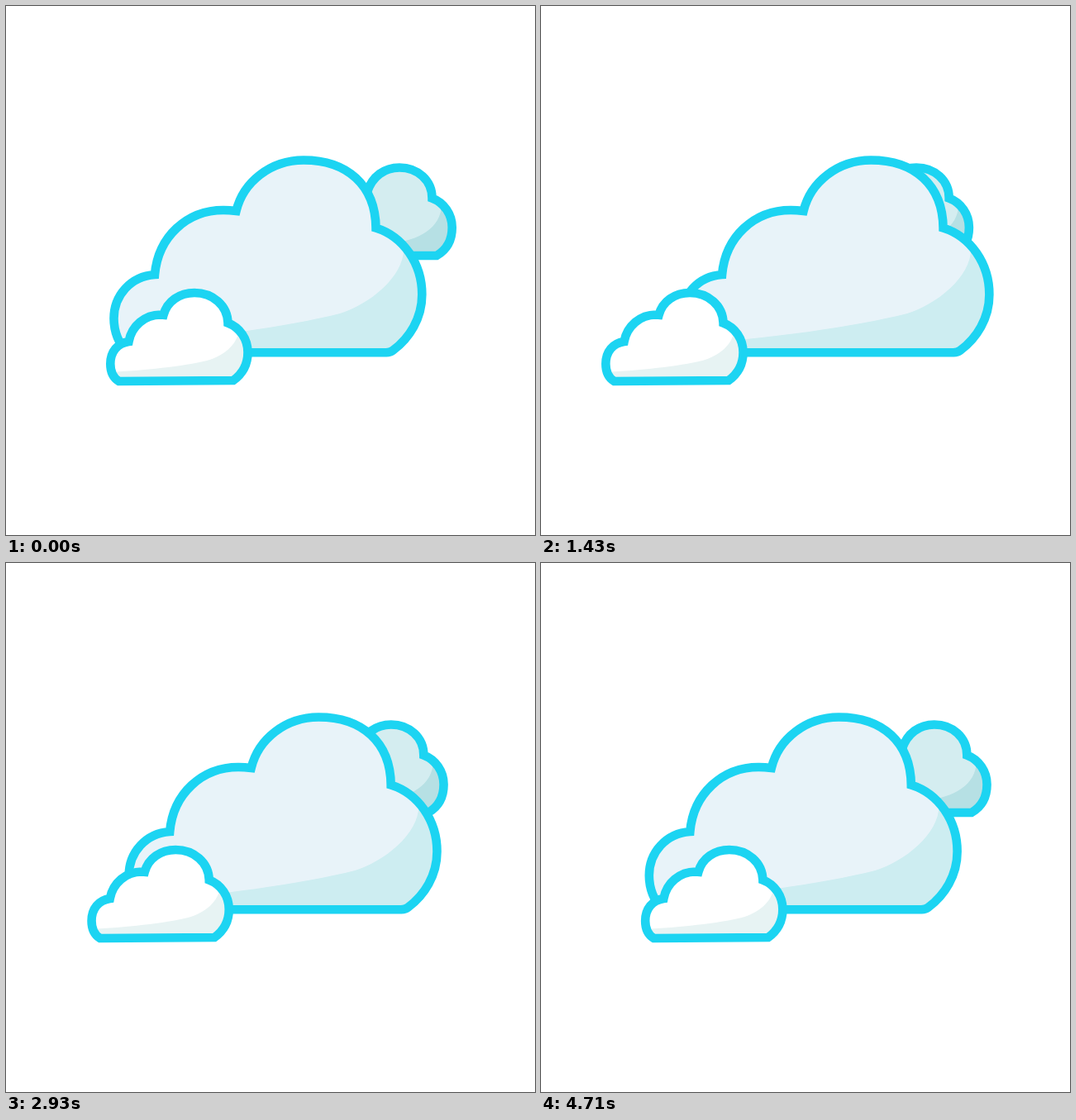
Write an HTML page with a canvas that moves like this. It is 640 by 640 pixels and loops after 4780 ms.

```html
<!DOCTYPE html>
<html lang="en">
<head>
<meta charset="utf-8">
<title>Drifting clouds</title>
<style>
  html, body { margin: 0; width: 100%; height: 100%; overflow: hidden; background: #fff; }
  canvas { display: block; width: 640px; height: 640px; }
</style>
</head>
<body>
<canvas id="sky" width="640" height="640"></canvas>
<script>
const ctx = document.getElementById('sky').getContext('2d');
const LOOP = 4780;
const FPS = 14;
const LINE = '#1cd4f2';

// Each cloud rests at keys 0, 2, 4 and is fully shifted at keys 1 and 3.
const evenKeys = [0, 1195, 2390, 3585, 4780];

const clouds = [
  {
    shift: -24, keys: evenKeys, fill: '#d4edf0', shadeFill: '#b6e0e4',
    body: new Path2D('M430 302 L521 302 C533 295 539.7 283 539.7 268' +
      ' C539.7 252 530 238 515.5 232.5 C515.5 211 498 195.5 476 195.5' +
      ' C458 195.5 443 206 437 225 C431 250 430 280 430 302 Z'),
    shade: new Path2D('M465 287 C500 284 526 268 527 241 L560 241 L560 320 L465 320 Z')
  },
  {
    shift: 43, keys: evenKeys, fill: '#e8f3f9', shadeFill: '#cdedf1',
    body: new Path2D('M180 325 C151 327 130.5 350 130.5 378' +
      ' C130.5 393 136 410 148 419.3 L460 419.3 Q465 419 468 416.8' +
      ' C488 402 503.3 378 503.3 349 C503.3 312 481 279 447.5 268.5' +
      ' C447 217 413 186.5 360 186.5 C320 186.5 287 213 278.5 248' +
      ' C273 247.3 268 247 263 247 C219 247 184 279 180 325 Z'),
    shade: new Path2D('M120 410 C230 404 340 388 404 372' +
      ' C440 361 484 326 481 290 L520 290 L520 430 L120 430 Z')
  },
  {
    shift: -53, keys: [0, 1190, 2385, 3580, 4750], fill: '#fff', shadeFill: '#e7f3f3',
    body: new Path2D('M148.5 406 C135 408 126.3 418 126.3 433' +
      ' C126.3 443 130 450 136.5 454 L275 453' +
      ' C286 445 292.5 433 292.5 419 C292.5 403 283 389 268.5 383.5' +
      ' C268 362 250 347 228 347 C210 347 195 357 190.5 373.8' +
      ' L187 373.5 C168 373.5 152 387 148.5 406 Z'),
    shade: new Path2D('M125 443 C165 441 215 436 243 429' +
      ' C262 424 281 410 282 390 L300 390 L300 460 L125 460 Z')
  }
];

function drift(t, keys) {
  let i = 0;
  while (i < 4 && t >= keys[i + 1]) i++;
  if (i === 4) return 0;
  const p = (t - keys[i]) / (keys[i + 1] - keys[i]);
  const eased = (1 - Math.cos(Math.PI * p)) / 2;
  return i % 2 ? 1 - eased : eased;
}

function drawCloud(cloud, t) {
  ctx.save();
  ctx.translate(cloud.shift * drift(t, cloud.keys), 0);
  ctx.fillStyle = cloud.fill;
  ctx.fill(cloud.body);
  ctx.save();
  ctx.clip(cloud.body);
  ctx.fillStyle = cloud.shadeFill;
  ctx.fill(cloud.shade);
  ctx.restore();
  ctx.strokeStyle = LINE;
  ctx.lineWidth = 10.6;
  ctx.lineJoin = 'miter';
  ctx.stroke(cloud.body);
  ctx.restore();
}

function render() {
  const now = performance.now() % LOOP;
  const t = Math.floor((now + 5) * FPS / 1000) * 1000 / FPS % LOOP;
  ctx.fillStyle = '#fff';
  ctx.fillRect(0, 0, 640, 640);
  clouds.forEach(cloud => drawCloud(cloud, t));
  requestAnimationFrame(render);
}
render();
</script>
</body>
</html>
```
